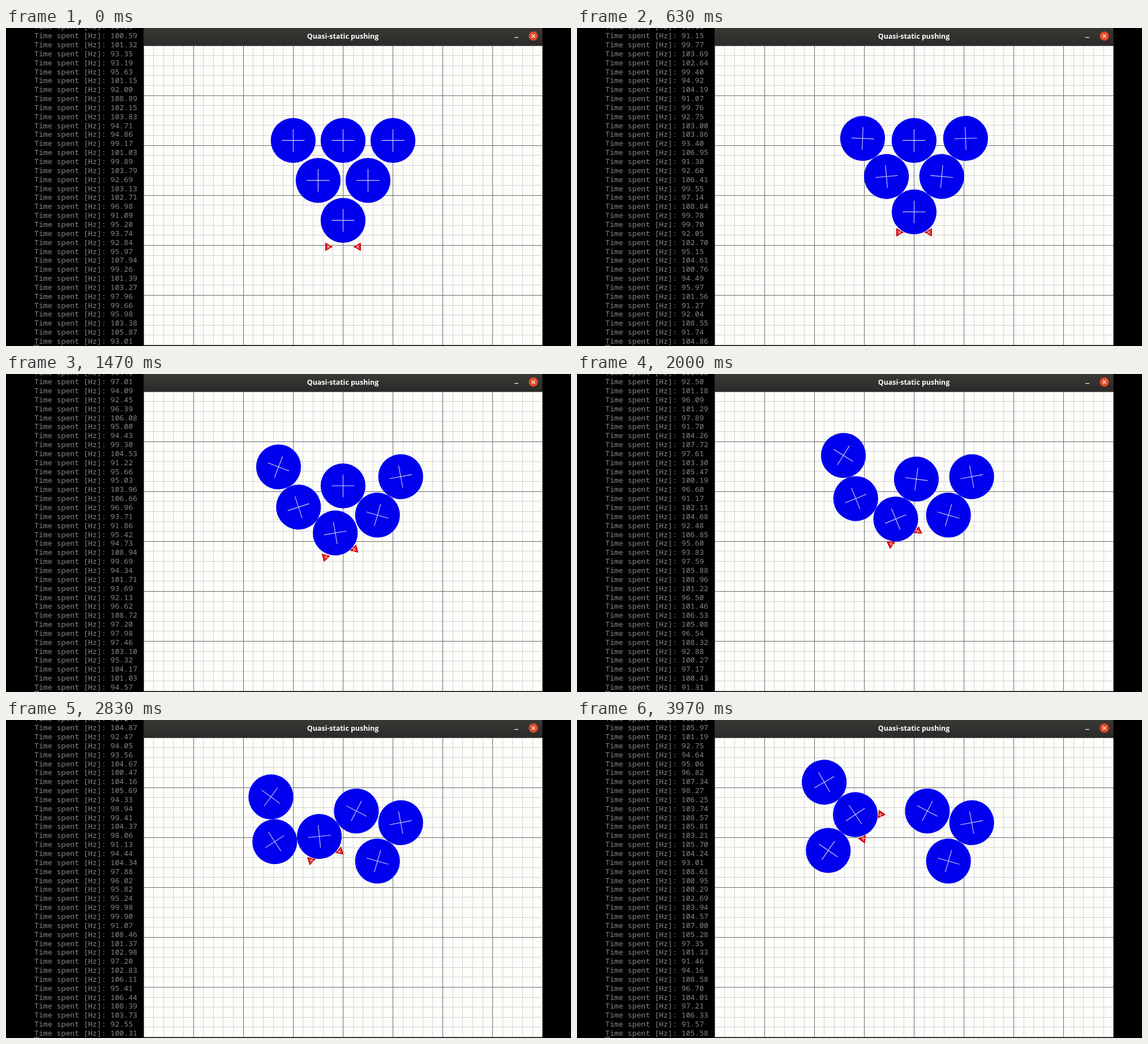
An HTML page with a canvas for the animation above (4010 ms loop, 998 by 561 pixels).

```html
<!DOCTYPE html>
<html lang="en">
<head>
<meta charset="utf-8">
<title>Quasi-static pushing</title>
<style>
html, body { margin: 0; width: 100%; height: 100%; overflow: hidden; background: #000; }
canvas { display: block; }
</style>
</head>
<body>
<canvas id="stage" width="998" height="561"></canvas>
<script>
const ctx = document.getElementById('stage').getContext('2d');
const LOOP = 4010, STEP = 100 / 3, STEPS = 120, SUBSTEPS = 4;
const LEFT = 243, TOP = 31, RIGHT = 947.5, BOTTOM = 559.5;
const UNIT = 88.1, CENTER = LEFT + 4 * UNIT;
const RADIUS = 0.45 * UNIT, FINGER_RADIUS = 4.75, REACH = 26;
const FRICTION = 0.45;

// Way points of the gripper: time, x, y, angle in degrees
const handPath = [
  [150, CENTER, 386, 0], [1030, CENTER, 339.5, 0], [1470, 590, 316, -15],
  [2000, 578.3, 288.5, -25.4], [2830, 564.3, 240, -17.3], [3330, 548.8, 213.2, -33.8],
  [3970, 520.7, 188, -54.4]
];

const clamp = (v, limit) => Math.max(-limit, Math.min(limit, v));

function handAt(t) {
  const next = handPath.findIndex(k => k[0] > t);
  if (next === 0) return handPath[0].slice(1);
  if (next < 0) return handPath[handPath.length - 1].slice(1);
  const a = handPath[next - 1], b = handPath[next], f = (t - a[0]) / (b[0] - a[0]);
  return [1, 2, 3].map(i => a[i] + (b[i] - a[i]) * f);
}

// grip: share of the friction that drags a pushed disc along; the rest rolls it
const body = (x, y, r, grip) => ({ x, y, r, grip, angle: 0, dx: 0, dy: 0, spin: 0 });

function shift(b, dx, dy) {
  b.x += dx;
  b.y += dy;
  b.dx += dx;
  b.dy += dy;
}

function moveFingers(fingers, t) {
  const [x, y, degrees] = handAt(t), a = degrees * Math.PI / 180;
  fingers.forEach((f, i) => {
    const side = i ? REACH : -REACH;
    shift(f, x + side * Math.cos(a) - f.x, y + side * Math.sin(a) - f.y);
  });
}

// Pushers move a disc out of overlap, then friction drags and rolls it
function pushDisc(disc, pushers) {
  const contacts = [];
  for (const p of pushers) {
    const x = disc.x - p.x, y = disc.y - p.y, dist = Math.hypot(x, y);
    const depth = p.r + disc.r - dist;
    if (depth <= 0) continue;
    const nx = x / dist, ny = y / dist;
    shift(disc, nx * depth, ny * depth);
    contacts.push({ p, nx, ny, depth });
  }
  const drags = contacts.map(({ p, nx, ny, depth }) => {
    const slip = (p.dy - disc.dy) * nx - (p.dx - disc.dx) * ny + p.spin * p.r;
    return clamp(slip, FRICTION * depth);
  });
  contacts.forEach(({ p, nx, ny }, i) => {
    shift(disc, -ny * drags[i] * p.grip, nx * drags[i] * p.grip);
    disc.spin -= drags[i] * (1 - p.grip) / disc.r;
  });
  disc.angle += disc.spin;
}

function simulate() {
  const [x, y] = handAt(0);
  const fingers = [-REACH, REACH].map(side => body(x + side, y, FINGER_RADIUS, 0.42));
  const discs = [];
  for (let row = 0; row < 3; row++) {
    for (let i = 0; i <= row; i++) {
      const grip = row ? 0.25 : 0.05;
      discs.push(body(CENTER + (i - row / 2) * UNIT, TOP + (3.5 - 0.8 * row) * UNIT, RADIUS, grip));
    }
  }
  const all = [...fingers, ...discs], poses = [];
  for (let n = 0; n < STEPS * SUBSTEPS; n++) {
    if (n % SUBSTEPS === 0) poses.push(discs.map(d => [d.x, d.y, d.angle]));
    for (const b of all) b.dx = b.dy = b.spin = 0;
    moveFingers(fingers, (n + 1) * STEP / SUBSTEPS);
    discs.forEach((d, i) => pushDisc(d, all.slice(0, fingers.length + i)));
  }
  return poses;
}

const poses = simulate();

function rate(n) {
  const r = Math.abs(Math.sin(n * 12.9898 + 4.1) * 43758.5453) % 1;
  return 91 + 18 * r ** 1.3;
}

function line(x1, y1, x2, y2) {
  ctx.beginPath();
  ctx.moveTo(x1, y1);
  ctx.lineTo(x2, y2);
  ctx.stroke();
}

function cross(size) {
  line(-size, 0, size, 0);
  line(0, -size, 0, size);
}

function place(x, y, angle, draw) {
  ctx.save();
  ctx.translate(x, y);
  ctx.rotate(angle);
  draw();
  ctx.restore();
}

function drawTerminal(step) {
  ctx.font = '13.2px "Noto Sans Mono", "DejaVu Sans Mono", monospace';
  ctx.textAlign = 'left';
  ctx.fillStyle = '#858585';
  const scrolled = Math.floor(step * 10 / 3);
  for (let row = -1; row < 35; row++) {
    const hz = rate(row + scrolled).toFixed(2);
    ctx.fillText('Time spent [Hz]: ' + hz, 50, 18.1 + row * 15.85);
  }
  ctx.strokeStyle = '#858585';
  ctx.lineWidth = 1;
  ctx.strokeRect(50.5, 559.5, 7, 15);
}

function drawTitleBar() {
  const shade = ctx.createLinearGradient(0, 0, 0, TOP);
  shade.addColorStop(0, '#393835');
  shade.addColorStop(1, '#2b2a28');
  ctx.fillStyle = shade;
  ctx.fillRect(LEFT, 0, RIGHT - LEFT, TOP);
  ctx.fillStyle = '#fff';
  ctx.font = 'bold 12.4px "Open Sans", "Noto Sans", sans-serif';
  ctx.textAlign = 'center';
  ctx.fillText('Quasi-static pushing', 595, 19.3);
  ctx.fillRect(898, 16, 7, 1.2);
  ctx.fillStyle = '#e04a28';
  ctx.beginPath();
  ctx.arc(931.5, 14.2, 8.2, 0, 7);
  ctx.fill();
  ctx.strokeStyle = '#fff';
  ctx.lineWidth = 1.3;
  place(931.5, 14.2, Math.PI / 4, () => cross(4.4));
}

function drawGrid() {
  ctx.fillStyle = '#fdfdfa';
  ctx.fillRect(LEFT, TOP, RIGHT - LEFT, BOTTOM - TOP);
  ctx.lineWidth = 1;
  for (const major of [false, true]) {
    ctx.strokeStyle = major ? '#6a6a6a' : '#d2d2d4';
    for (let i = 0; i < 40; i++) {
      if ((i % 5 === 0) !== major) continue;
      const x = Math.floor(LEFT + i * UNIT / 5) + 0.5, y = Math.floor(TOP + i * UNIT / 5) + 0.5;
      line(x, TOP, x, BOTTOM);
      if (i <= 30) line(LEFT, y, RIGHT, y);
    }
  }
}

function drawFinger() {
  ctx.fillStyle = '#d60010';
  ctx.beginPath();
  ctx.moveTo(-5.5, -7.5);
  ctx.lineTo(-5.5, 7.5);
  ctx.lineTo(8, 0);
  ctx.fill();
  ctx.rotate(Math.PI / 4);
  ctx.strokeStyle = '#ffe4e4';
  ctx.lineWidth = 1;
  cross(4);
}

function drawDisc() {
  ctx.fillStyle = '#0000ee';
  ctx.beginPath();
  ctx.arc(0, 0, RADIUS, 0, 7);
  ctx.fill();
  ctx.strokeStyle = '#d8d8f0';
  ctx.lineWidth = 1.1;
  cross(20);
}

function frame(now) {
  const step = Math.min(STEPS - 1, Math.floor((now % LOOP + 4) / STEP));
  ctx.fillStyle = '#000';
  ctx.fillRect(0, 0, 998, 561);
  drawTerminal(step);
  drawGrid();
  drawTitleBar();
  const [x, y, degrees] = handAt(step * STEP);
  place(x, y, degrees * Math.PI / 180, () => {
    place(-REACH, 0, 0, drawFinger);
    place(REACH, 0, Math.PI, drawFinger);
  });
  for (const pose of poses[step]) place(...pose, drawDisc);
}

const start = performance.now();
function tick() {
  frame(performance.now() - start);
  requestAnimationFrame(tick);
}
tick();
</script>
</body>
</html>
```
